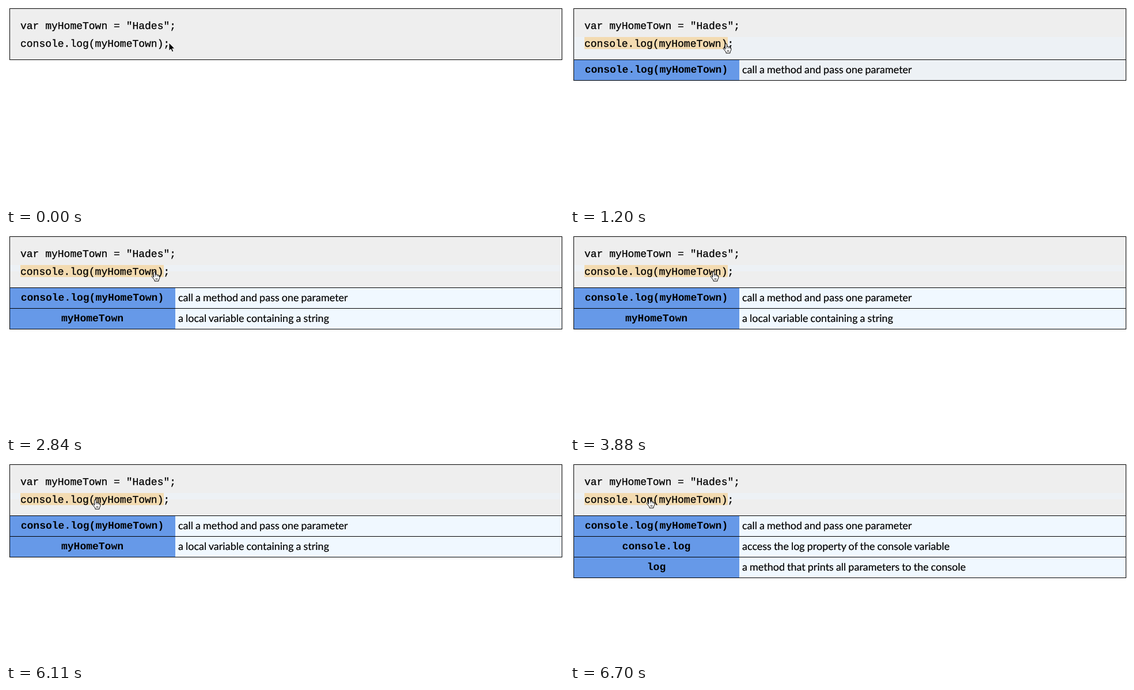
Write an HTML page that moves like this. It is 969 px wide and 348 px high and loops after 8 s.

```html
<!DOCTYPE html>
<html lang="en">
<head>
<meta charset="utf-8">
<title>Hover explanations</title>
<style>
  html, body { margin: 0; width: 100%; height: 100%; overflow: hidden; background: #fff; }
  svg { display: block; }
  text { font: 18px Lato, sans-serif; word-spacing: -.6px; stroke: #000; stroke-width: .2; text-rendering: geometricPrecision; }
  .code { font-family: "Liberation Mono", monospace; word-spacing: 0; stroke-width: .3; }
  .term { font-weight: bold; text-anchor: middle; stroke: none; }
</style>
</head>
<body>
<svg width="969" height="348">
  <rect x="6" y="4" width="960" height="90" fill="#eee"/>
  <rect id="tint" x="7" y="54" width="958" fill="#edf1f5"/>
  <rect id="mark" x="25" y="54" width="249" height="21" fill="#f3dbb1"/>
  <rect x="6.5" y="4.5" width="959" height="89" fill="none" stroke="#000"/>
  <text class="code" x="25" y="40">var myHomeTown = "Hades";</text>
  <text class="code" x="25" y="71">console.log(myHomeTown);</text>
  <g id="table"></g>
  <g id="cursor">
    <path id="arrow" d="M1 1V15L4.3 12 6.5 17 8.9 16 6.8 11.2H11Z" stroke="#fff"/>
    <path id="beam" d="M.5 .5H2Q3.5 .5 3.5 2V15Q3.5 16.5 2 16.5H.5M6.5 .5H5Q3.5 .5 3.5 2M6.5 16.5H5Q3.5 16.5 3.5 15M2 10.5H5" fill="none" stroke="#000"/>
    <g id="hand" stroke="#000" stroke-linejoin="round" stroke-linecap="round">
      <path fill="#fff" d="M4.5 10V2Q4.5 .6 6 .6T7.5 2V6Q8 5 9 5.1T10.5 6.5Q11 5.6 12 5.9T13 7.5Q14.8 6.8 14.8 9V11.5L13 15V17H6V15L3 11.5 1.5 9.3Q1 7.8 2.3 7.6T4.5 10Z"/>
      <path fill="none" d="M7.5 6V8.5M10.5 6.5V8.5M13 7.5V9M8.5 12V14.5M10.5 12V14.5" stroke-width=".8"/>
    </g>
  </g>
</svg>
<script>
const $ = id => document.getElementById(id);
const LOOP = 8000, TICK = 148.9;
const LEFT = 25, CHAR = 10.8, HOTSPOT = 7;
const call = "console.log(myHomeTown)";

// first character, end, meaning
const parts = [
  [0, 23, "call a method and pass one parameter"],
  [0, 11, "access the log property of the console variable"],
  [8, 11, "a method that prints all parameters to the console"],
  [12, 22, "a local variable containing a string"]
];
// The property access is explained only while its name is hovered.
const hoverStart = ([start, end]) => end === 11 ? 8 : start;

// Cursor strokes and rests: tick, x, y
const keys = [
  [0, 282, 63], [1, 273, 57], [2, 273, 57], [3, 269, 57], [7, 269, 57],
  [8, 265, 65], [9, 263, 65], [17, 263, 65], [20, 247, 65], [25, 247, 65], [26, 243, 65],
  [31, 186, 65], [35, 156, 66], [40, 155, 66], [43, 137, 63], [45, 132, 63]
];

function cursorAt(tick) {
  const i = keys.findIndex(key => key[0] > tick);
  if (i < 0) return keys.at(-1).slice(1);
  const [a, b] = [keys[i - 1], keys[i]];
  const p = (tick - a[0]) / (b[0] - a[0]);
  return [1, 2].map(k => Math.round(a[k] + (b[k] - a[k]) * p));
}

function drawRow([start, end, meaning], i, rows) {
  const y = 94 + 36 * i;
  const fill = rows.length > 1 ? "#f0f8ff" : "#edf1f5";
  return `<rect x="6.5" y="${y - .5}" width="959" height="36" fill="${fill}" stroke="#000"/>
    <rect x="7" y="${y}" width="287" height="35" fill="#6699e8"/>
    <text class="code term" x="150" y="${y + 22}">${call.slice(start, end)}</text>
    <text x="299" y="${y + 23}">${meaning}</text>`;
}

function draw(tick) {
  const [x, y] = cursorAt(tick);
  const char = Math.floor((x + HOTSPOT - LEFT) / CHAR);
  const rows = parts.filter(part => char >= hoverStart(part) && char < part[1]);
  const hovering = rows.length > 0;

  $("table").innerHTML = rows.map(drawRow).join("");
  $("mark").style.display = hovering ? "" : "none";
  $("tint").setAttribute("height", [0, 39][rows.length] ?? 11);

  const shape = hovering ? "hand" : tick ? "beam" : "arrow";
  for (const el of $("cursor").children) el.style.display = el.id === shape ? "" : "none";
  $("cursor").setAttribute("transform", `translate(${x} ${y})`);
}

const start = performance.now();
let shown;
function frame() {
  const t = (performance.now() - start) % LOOP;
  const tick = Math.floor((t + 6) / TICK);
  if (tick !== shown) draw(shown = tick);
  requestAnimationFrame(frame);
}
frame();
</script>
</body>
</html>
```
